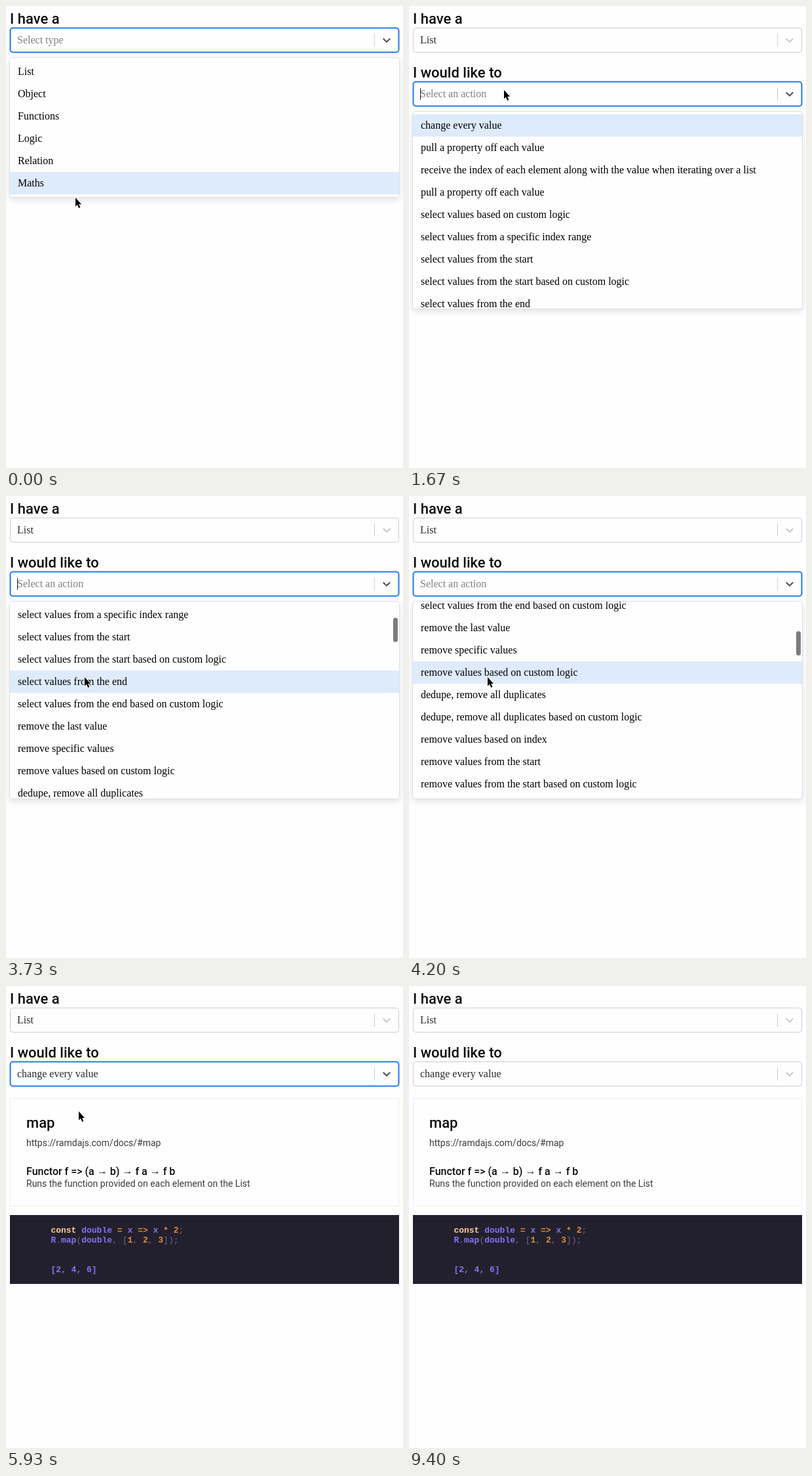
Animation, 606 px wide and 704 px high, one loop 9470 ms. Source, as an HTML page:

```html
<!DOCTYPE html>
<html lang="en">
<head>
<meta charset="utf-8">
<title>Function finder</title>
<style>
  html, body { margin: 0; width: 100%; height: 100%; overflow: hidden; background: #fefefe; }
  svg { display: block; }
  text { font: 16px "Liberation Serif", serif; fill: #000; }
  .head { font: 500 22px Roboto, sans-serif; fill: #0c0c0e; }
  .sign { font: 500 16px Roboto, "Liberation Sans", sans-serif; fill: #0c0c0e; }
  .arrow { font-weight: 700; baseline-shift: 1px; }
  .body { font: 14px Roboto, sans-serif; fill: #3c3c3e; }
  .value { fill: #2b2b2d; }
  .value.empty { fill: #808080; }
  .box { fill: #fefefe; stroke: #cdcdd2; }
  .bar { fill: #cdcdd2; }
  .chevron { fill: none; stroke: #cccccf; stroke-width: 2.3; stroke-linecap: round; stroke-linejoin: round; }
  .focus .box { stroke: #217bf0; stroke-width: 2; }
  .focus .chevron { stroke: #58585c; }
  .menu { fill: #fefefe; stroke: #e0e0e3; filter: drop-shadow(0 4px 5px rgba(0, 0, 0, .1)); }
  .hover { fill: #deebfd; }
  .card { fill: none; stroke: #edeafa; }
  .code text { font: 700 13px "Liberation Mono", monospace; fill: #8a70f4; }
  .code .key { fill: #ffcc99; }
  .code .op, .code .num { fill: #e08a40; }
  .code .punct { fill: #6c6783; font-weight: 400; }
  .code.selected text { fill: #7f72cc; }
  .mark { fill: #5877a0; }
</style>
</head>
<body>
<svg id="stage" width="606" height="704" viewBox="0 0 606 704"></svg>
<script>
const LOOP = 9470, STEP = 200 / 3, ROW = 34;
const OPEN_ACTION = 1460, PICK_TYPE = 930, PICK_ACTION = 5865;
const DRAG = 6930, CLEAR = 8260;

const types = ['List', 'Object', 'Functions', 'Logic', 'Relation', 'Maths'];
const custom = ' based on custom logic';
const actions = [
  'change every value',
  'pull a property off each value',
  'receive the index of each element along with the value when iterating over a list',
  'pull a property off each value',
  'select values' + custom,
  'select values from a specific index range',
  'select values from the start',
  'select values from the start' + custom,
  'select values from the end',
  'select values from the end' + custom,
  'remove the last value',
  'remove specific values',
  'remove values' + custom,
  'dedupe, remove all duplicates',
  'dedupe, remove all duplicates' + custom,
  'remove values based on index',
  'remove values from the start',
  'remove values from the start' + custom,
  'remove values from the end',
  'remove values from the end' + custom,
  'remove adjacent duplicates',
  'remove falsy values',
  'find a value' + custom
];

// Time, x, y of the pointer tip
const pointerPath = [
  [0, 106, 292], [130, 106, 290], [760, 98, 104], [950, 98, 104],
  [1400, 145, 128], [1950, 145, 128], [2700, 120, 276], [5350, 120, 276],
  [5750, 111, 190], [5960, 111, 191], [6800, 9, 357], [6950, 9, 357],
  [7650, 140, 430], [8330, 140, 430], [9000, -24, 410], [LOOP, -24, 410]
];
const scrollPath = [
  [0, 0], [3200, 0], [3333, 22], [3700, 160], [4200, 321],
  [4730, 420], [4870, 420], [5400, 0], [LOOP, 0]
];

const smooth = k => k * k * (3 - 2 * k);
const clamp = (v, lo, hi) => Math.max(lo, Math.min(hi, v));

function along(path, t, ease = k => k) {
  const i = Math.max(1, path.findIndex(p => p[0] > t));
  const [a, b] = [path[i - 1], path[i]];
  const k = ease((t - a[0]) / (b[0] - a[0]));
  return a.slice(1).map((v, n) => v + (b[n + 1] - v) * k);
}

const label = (x, y, cls, s) => `<text x="${x}" y="${y}" class="${cls}">${s}</text>`;

const select = (id, y) => `
  <g id="${id}">
    <rect class="box" x="6.5" y="${y + .5}" width="593" height="37" rx="4"/>
    <text class="value" x="17" y="${y + 24}"></text>
    <rect class="bar" x="562" y="${y + 9}" width="1" height="20"/>
    <path class="chevron" d="M576.4 ${y + 17.2}l4.6 4.5 4.6-4.5"/>
  </g>`;

const menu = (id, y, h, items) => `
  <g id="${id}">
    <rect class="menu" x="5.5" y="${y - .5}" width="595" height="${h + 1}" rx="4"/>
    <clipPath id="${id}Clip"><rect x="6" y="${y}" width="594" height="${h}" rx="4"/></clipPath>
    <g clip-path="url(#${id}Clip)"><g class="list">
      <rect class="hover" x="6" width="594" height="${ROW}"/>
      ${items.map((s, i) => label(18, y + 26 + i * ROW, '', s)).join('')}
    </g></g>
  </g>`;

// Token kinds: k keyword, o operator, n number, p punctuation, i identifier
const kinds = { k: 'key', o: 'op', n: 'num', p: 'punct', i: '' };
const tokens = s => s.split('|').map(part =>
  `<tspan class="${kinds[part[0]]}">${part.slice(1).replace('>', '&gt;')}</tspan>`).join('');
const line1 = 'kconst|i double |o=|i x |o=>|i x |o*|n 2|p;';
const line2 = 'iR|p.|imap|p(|idouble|p, [|n1|p, |n2|p, |n3|p]);';
const lineChars = [35, 34, 7, 1, 17];
const signature = 'Functor f =&gt; (a → b) → f a → f b'
  .replace(/→/g, '<tspan class="arrow">→</tspan>');

const stage = document.getElementById('stage');
stage.innerHTML = `
  ${label(6, 27, 'head', 'I have a')}
  ${select('type', 33)}
  <g id="second">
    ${label(6, 109, 'head', 'I would like to')}
    ${select('action', 115)}
    <rect id="caret" x="17" y="125" width="1" height="18" fill="#222"/>
  </g>
  <g id="result">
    <rect class="card" x="6.5" y="171.5" width="593" height="164"/>
    ${label(31, 216, 'head', 'map')}
    ${label(31, 244, 'body', 'https://ramdajs.com/docs/#map')}
    ${label(31, 288, 'sign', signature)}
    ${label(31, 306, 'body', 'Runs the function provided on each element on the List')}
    <rect x="6" y="349" width="594" height="105" fill="#23202d"/>
    <g id="code" class="code">
      ${lineChars.map((n, i) => `<rect class="mark" x="6" y="${364 + i * 15}" height="15"/>`).join('')}
      ${label(68.4, 376, '', tokens(line1))}
      ${label(68.4, 391, '', tokens(line2))}
      ${label(68.4, 436, '', '[2, 4, 6]')}
    </g>
  </g>
  ${menu('types', 79, 212, types)}
  ${menu('actions', 161, 300, actions)}
  <rect id="thumb" x="591" width="7" height="37" rx="3.5" fill="#7c7c7e"/>
  <path id="pointer" d="M0 0v13.4l2.9-2.7 2.3 5.3 2.2-1-2.2-5.1h3.9z"
    fill="#000" stroke="#fff" stroke-width="1.6" paint-order="stroke"/>`;

const $ = id => document.getElementById(id);
const marks = [...document.querySelectorAll('.mark')];
const show = (id, on) => { $(id).style.display = on ? '' : 'none'; };

function setSelect(id, focused, value, hint) {
  $(id).setAttribute('class', focused ? 'focus' : '');
  const text = $(id).querySelector('.value');
  text.textContent = value || hint;
  text.classList.toggle('empty', !value);
}

function setMenu(id, top, count, y, scroll) {
  const row = clamp(Math.floor((y - top + scroll) / ROW), 0, count - 1);
  const list = $(id).querySelector('.list');
  list.setAttribute('transform', `translate(0 ${-scroll})`);
  list.querySelector('.hover').setAttribute('y', top + row * ROW);
}

function setMarks(on, x, y) {
  const current = Math.floor((y + 2 - 364) / 15);
  marks.forEach((mark, i) => {
    const reach = i < current ? lineChars[i]
      : i === current ? clamp(Math.round((x - 6) / 7.8), 0, lineChars[i]) : 0;
    mark.setAttribute('width', on ? reach * 7.8 : 0);
  });
  $('code').classList.toggle('selected', on && current > 0);
}

function draw(t) {
  const [x, y] = along(pointerPath, t, smooth);
  const scroll = Math.round(along(scrollPath, t)[0]);
  const choosing = t >= OPEN_ACTION && t < PICK_ACTION;

  setSelect('type', t < OPEN_ACTION, t >= PICK_TYPE && 'List', 'Select type');
  setSelect('action', t >= OPEN_ACTION && t < DRAG, t >= PICK_ACTION && actions[0], 'Select an action');
  show('second', t >= PICK_TYPE);
  show('types', t < PICK_TYPE);
  show('actions', choosing);
  show('caret', choosing && (t - OPEN_ACTION) % 1000 < 500);
  show('result', t >= PICK_ACTION);
  show('thumb', t > 3220 && t < 5750);

  setMenu('types', 83, types.length, y, 0);
  setMenu('actions', 165, actions.length, y, scroll);
  $('thumb').setAttribute('y', 162 + scroll * .137);
  setMarks(t >= DRAG && t < CLEAR, x, y);
  $('pointer').setAttribute('transform', `translate(${Math.round(x)} ${Math.round(y)})`);
}

const start = performance.now();
function tick() {
  const t = (performance.now() - start) % LOOP;
  draw(Math.min(Math.floor((t + 5) / STEP) * STEP, LOOP - 1));
  requestAnimationFrame(tick);
}
tick();
</script>
</body>
</html>
```
